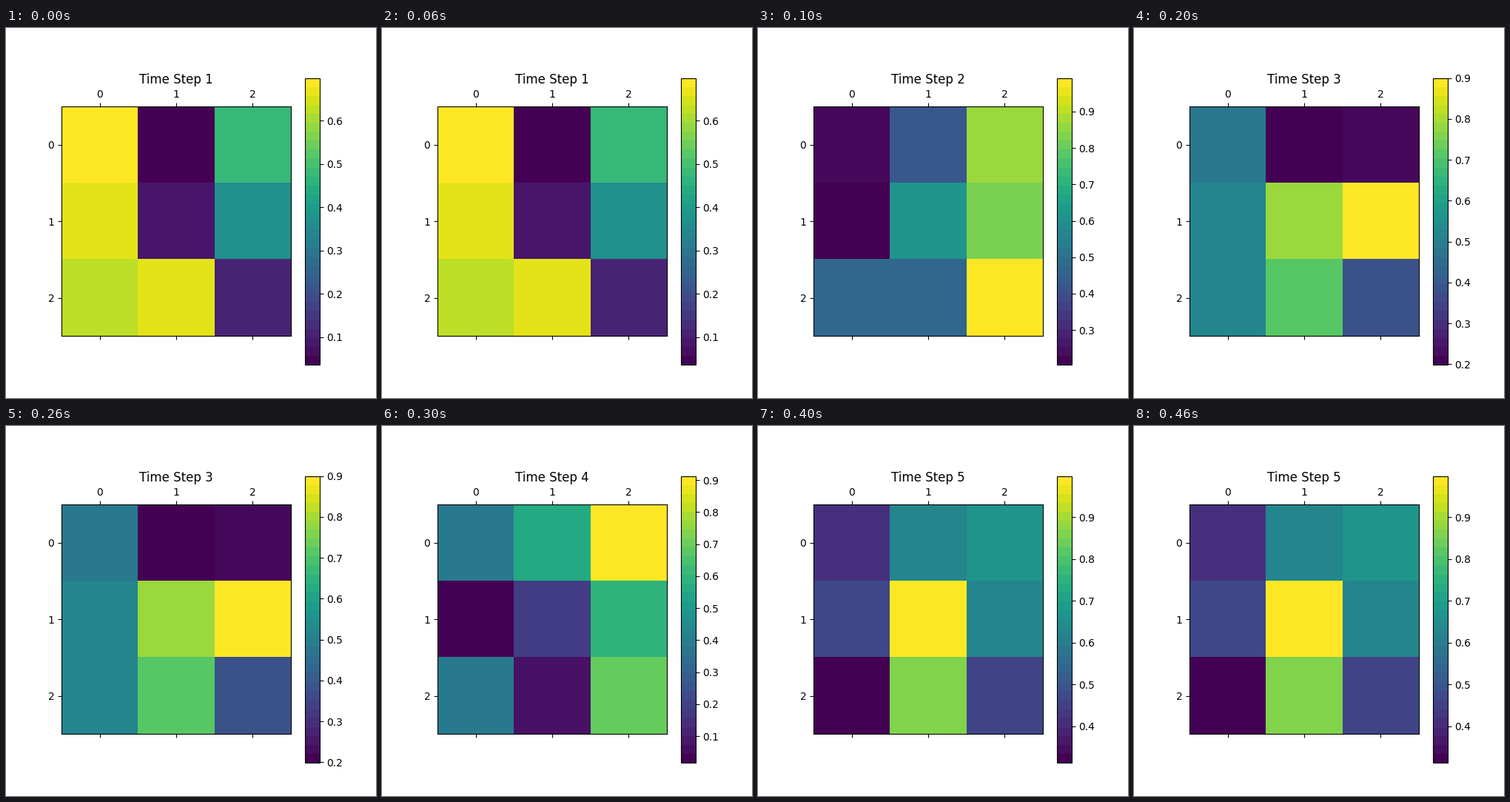
Write a matplotlib script that moves like this. It is 500 px wide and 500 px high and loops after 0.5 s.

```python
import numpy as np
import matplotlib.pyplot as plt
from matplotlib.animation import FuncAnimation
from matplotlib.cm import ScalarMappable
from matplotlib.colors import Normalize

# Measured value of each cell; colour limits and ticks follow from these.
GRIDS = np.array([
    [[.699, .036, .480], [.672, .076, .368], [.633, .672, .102]],
    [[.220, .417, .874], [.2045, .614, .835], [.465, .465, .9925]],
    [[.479, .199, .213], [.518, .795, .900], [.518, .718, .374]],
    [[.380, .564, .913], [.017, .178, .599], [.380, .062, .700]],
    [[.405, .625, .669], [.460, .999, .625], [.3125, .869, .453]],
])
BANDS = 32
TITLE_PAD = 5.3

fig = plt.figure(figsize=(5, 5), dpi=100)
ax = fig.add_axes([0.15, 0.09, 0.775, 0.775])
norm = Normalize(GRIDS[0].min(), GRIDS[0].max())
cells = ax.matshow(GRIDS[0], cmap="viridis", norm=norm)
scale = ScalarMappable(norm, plt.get_cmap("viridis", BANDS))
fig.colorbar(scale, ax=ax)


def draw(step):
    grid = GRIDS[step]
    norm.vmin, norm.vmax = grid.min(), grid.max()
    cells.set_data(grid)
    ax.set_title(f"Time Step {step + 1}", pad=TITLE_PAD)
    return [cells]


anim = FuncAnimation(fig, draw, frames=len(GRIDS), interval=100,
                     repeat=True, repeat_delay=0, blit=False)
plt.show()
```
